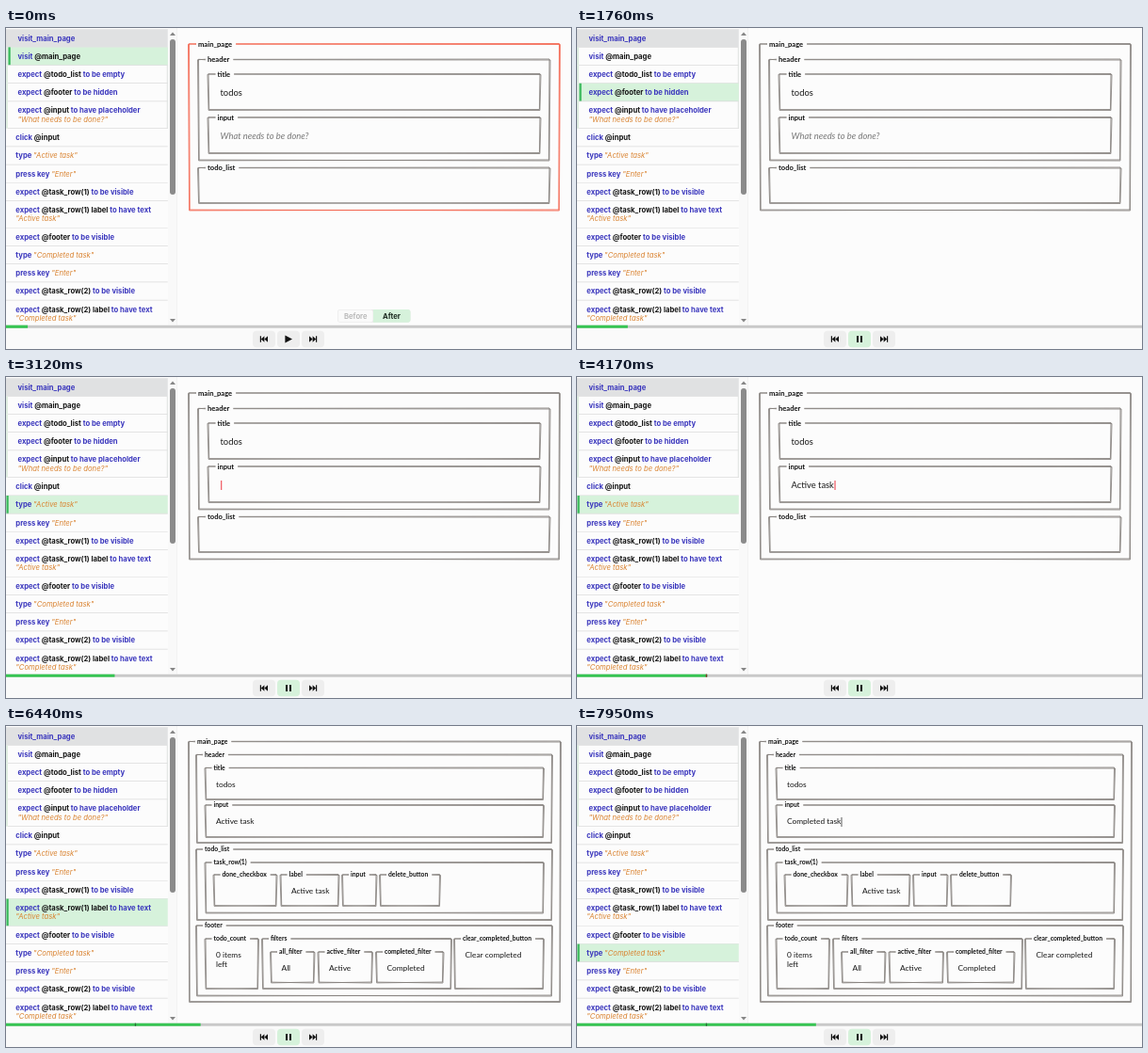
These frames come from a looping animation (600 by 341 pixels, 8 s). An HTML page with a canvas:

```html
<!DOCTYPE html>
<html lang="en">
<head>
<meta charset="utf-8">
<title>Test player</title>
<style>
html, body { margin: 0; width: 100%; height: 100%; overflow: hidden; background: #fcfcfc; }
canvas { display: block; width: 600px; height: 341px; }
</style>
</head>
<body>
<canvas id="stage"></canvas>
<script>
const W = 600, H = 341, LOOP = 8000;
const canvas = document.getElementById('stage');
const ctx = canvas.getContext('2d');
const ratio = window.devicePixelRatio || 1;
canvas.width = W * ratio;
canvas.height = H * ratio;

const GREEN = '#d6f2db', RED = '#f4634c', GRAY = '#85807c', BLUE = '#3a36bd';
const UI = 'Inter, sans-serif', HAND = 'Lato, sans-serif';

// '@' marks element names, quotes mark values, '|' breaks the line
const rows = [
  'visit_main_page', 'visit @main_page', 'expect @todo_list to be empty',
  'expect @footer to be hidden',
  'expect @input to have placeholder|"What needs to be done?"',
  'click @input', 'type "Active task"', 'press key "Enter"',
  'expect @task_row(1) to be visible',
  'expect @task_row(1) label to have text|"Active task"',
  'expect @footer to be visible', 'type "Completed task"', 'press key "Enter"',
  'expect @task_row(2) to be visible',
  'expect @task_row(2) label to have text|"Completed task"'
];
const stepStarts = [-500, 1510, 1710, 1910, 2110, 3120, 5070, 6080, 6280, 6480, 6680];
const STEP_WIDTH = W / 26;

// label, left, top, right, bottom, content
const emptyPage = [
  ['main_page', 194, 17, 588, 193.5], ['header', 204, 33.5, 577.5, 140.5],
  ['title', 214.5, 49, 567.5, 87, 'todos'], ['input', 214.5, 95, 567.5, 133],
  ['todo_list', 204, 148.5, 577.5, 186]
];
const taskPage = [
  ['main_page', 194, 16.5, 589, 293], ['header', 202, 30.5, 580, 124],
  ['title', 211.5, 44.5, 571, 78, 'todos'], ['input', 211.5, 84, 571, 118],
  ['todo_list', 202, 131, 580, 206], ['task_row(1)', 211.5, 145, 571, 198.5],
  ['done_checkbox', 220.5, 158, 287.5, 191], ['label', 291.5, 158, 353.5, 191, 'Active task'],
  ['input', 357, 158, 393.5, 191, ''], ['delete_button', 397, 158, 461, 191],
  ['footer', 202, 212, 580, 286.5], ['todo_count', 211.5, 226, 268, 279, '0 items|left'],
  ['filters', 272, 226, 473, 279], ['all_filter', 281, 240, 327.5, 272.5, 'All'],
  ['active_filter', 331.5, 240, 389, 272.5, 'Active'],
  ['completed_filter', 393, 240, 464.5, 272.5, 'Completed'],
  ['clear_completed_button', 476, 226, 571, 279, 'Clear completed']
];

const clamp = (v, lo, hi) => Math.min(hi, Math.max(lo, v));
const ease = p => 1 - (1 - p ** 1.3) ** 2.2;
const typed = (word, t, start) => word.slice(0, clamp(Math.floor((t - start) / 80) + 1, 0, word.length));

function rect(x, y, w, h, color, radius = 0) {
  ctx.fillStyle = color;
  ctx.beginPath();
  ctx.roundRect(x, y, w, h, radius);
  ctx.fill();
}

function poly(color, ...points) {
  ctx.fillStyle = color;
  ctx.beginPath();
  points.forEach(([x, y]) => ctx.lineTo(x, y));
  ctx.fill();
}

// Returns the x where the text ends
function text(str, x, y, font, color) {
  ctx.font = font;
  ctx.fillStyle = color;
  ctx.fillText(str, x, y);
  return x + ctx.measureText(str).width;
}

function drawRowLine(line, x, y) {
  for (const part of line.split(/("[^"]*"|@\S+(?: label)?)/)) {
    const quoted = part[0] === '"';
    const color = quoted ? '#d9822f' : part[0] === '@' ? '#151515' : BLUE;
    x = text(part, x, y, `${quoted ? 'italic 400' : '700'} 7.68px ${UI}`, color);
  }
}

function drawList(active) {
  let y = 1.2;
  rows.forEach((row, i) => {
    const lines = row.split('|');
    const h = lines.length > 1 ? 28.8 : 19.2;
    const child = i > 0 && i < 5;
    const left = child ? 2 : 0;
    if (i === 0) rect(0, y, 171.8, h, '#e0e1e2');
    if (child) {
      rect(0, y, 2, h, '#e0eee2');
      rect(170.8, y, 1, h, '#dfe3e0');
    }
    if (i === active) {
      rect(left, y, 171.8 - left, h, GREEN);
      rect(left + 0.5, y, 2.2, h, '#35b858');
    }
    rect(left, y + h - 0.5, 171.8 - left, 0.7, '#dcdcdc');
    lines.forEach((line, n) => drawRowLine(line, i < 5 ? 12.5 : 10.3, y + 10 + n * 9.4));
    y += h;
  });
  rect(172, 0, 9.5, 316, '#f9f9f9');
  rect(181, 0, 0.6, 316, '#ececec');
  rect(174, 12, 6, 165, '#8b8b8b', 3);
  poly('#858585', [174, 8], [180, 8], [177, 4.5]);
  poly('#858585', [174, 309], [180, 309], [177, 312.5]);
}

// Hand-drawn frame: two slightly skewed strokes with a gap for the label
function drawBox([label, l, t, r, b, content], big, color) {
  const labelX = l + (big ? 10 : 9);
  const end = text(label, labelX, t + 0.3, `700 ${big ? 7.6 : 6.8}px ${HAND}`, '#111');
  ctx.strokeStyle = color;
  ctx.lineWidth = 0.85;
  for (const s of [-0.5, 0.5]) {
    ctx.beginPath();
    ctx.moveTo(end + 4, t + s * 0.4);
    ctx.lineTo(r + s, t + s);
    ctx.lineTo(r - 0.8 + s * 0.5, b + s);
    ctx.lineTo(l + 0.9 + s * 0.6, b - s * 0.8);
    ctx.lineTo(l + s, t - s * 0.5);
    ctx.lineTo(labelX - 2, t + s * 0.6);
    ctx.stroke();
  }
  if (content) content.split('|').forEach((line, n) => drawContent(line, l, t + n * 10, big));
}

function drawContent(str, l, t, big, hint) {
  const font = `${hint ? 'italic ' : ''}${big ? 9.4 : 8.35}px ${HAND}`;
  return text(str, l + (big ? 13 : 11.5), t + (big ? 20.5 : 17.7), font, hint ? '#777' : '#161616');
}

function drawPage(t) {
  const big = t < 5320;
  const page = big ? emptyPage : taskPage;
  const clicking = t >= 2110 && t < 3120;
  page.forEach((box, i) => {
    const hot = i === 0 && t < 1510 || i === 3 && clicking;
    drawBox(box, big, hot ? RED : GRAY);
  });

  const [, l, top] = page[3];
  if (t < 3120) {
    drawContent('What needs to be done?', l, top, big, true);
  } else {
    const value = t < 6680 ? typed('Active task', t, 3370) : typed('Completed task', t, 6910);
    const end = drawContent(value, l, top, big);
    if (t < 4580) rect(end + 0.5, 110, 1.3, 10, '#f0646c');
    else if (t >= 6680) rect(end + 0.3, 97, 0.8, 10, '#333');
  }

  if (clicking) {
    const pulse = Math.sin(Math.PI * clamp((t - 2350) / 280, 0, 1));
    ctx.beginPath();
    ctx.arc(390.8, 116, 4.2 + 4.3 * pulse, 0, 7);
    ctx.fillStyle = '#f04444';
    ctx.fill();
    ctx.strokeStyle = '#c23a3a';
    ctx.lineWidth = 0.6;
    ctx.stroke();
  }
}

function drawSkip(x, dir) {
  rect(x - dir * 3.6 - 0.6, 327.2, 1.2, 6.6, '#111');
  for (const dx of [-3.2, 0.4]) {
    const tip = x + dir * dx, base = tip + dir * 3.6;
    poly('#111', [tip, 330.5], [base, 327.2], [base, 333.8]);
  }
}

function drawControls(t, progress) {
  rect(0, 315.7, W, 3.1, '#c9c9c9');
  rect(0, 315.7, progress, 3.1, '#37c553');
  if (t >= 3360) rect(136.8, 315.7, 1.3, 3.1, t < 5070 ? '#8a2c2c' : '#2a6a38');
  for (const x of [262, 288, 314]) {
    rect(x, 321.8, 24, 17.4, x === 288 && t >= 1180 ? GREEN : '#eeeeee', 4);
  }
  drawSkip(274, 1);
  drawSkip(326, -1);
  if (t < 560) {
    poly(t < 30 ? '#111' : '#333', [296.4, 326.4], [304, 330.5], [296.4, 334.6]);
  } else {
    rect(297, 327, 2, 7, '#111');
    rect(301, 327, 2, 7, '#111');
  }
  if (t < 560) {
    rect(352, 299, 77.5, 13.8, '#e8e8e8', 3);
    rect(352.6, 299.6, 37, 12.6, '#fafafa', 2.5);
    rect(390, 299, 39.5, 13.8, GREEN, [0, 3, 3, 0]);
    text('Before', 359, 306.4, `600 7.68px ${UI}`, '#b4b4b4');
    text('After', 400, 306.4, `700 7.68px ${UI}`, '#1d2b20');
  }
}

function draw(now) {
  const t = now % LOOP;
  const step = stepStarts.findLastIndex(start => t >= start);
  const progress = STEP_WIDTH * (step + ease(clamp((t - stepStarts[step]) / 200, 0, 1)));
  ctx.setTransform(ratio, 0, 0, ratio, 0, 0);
  ctx.textBaseline = 'middle';
  rect(0, 0, W, H, '#fcfcfc');
  drawList(step + 1);
  drawPage(t);
  rect(0, 315.7, W, 25.3, '#fafafa');
  drawControls(t, progress);
}

const began = performance.now();
function tick() {
  draw(performance.now() - began);
  requestAnimationFrame(tick);
}
tick();
</script>
</body>
</html>
```
